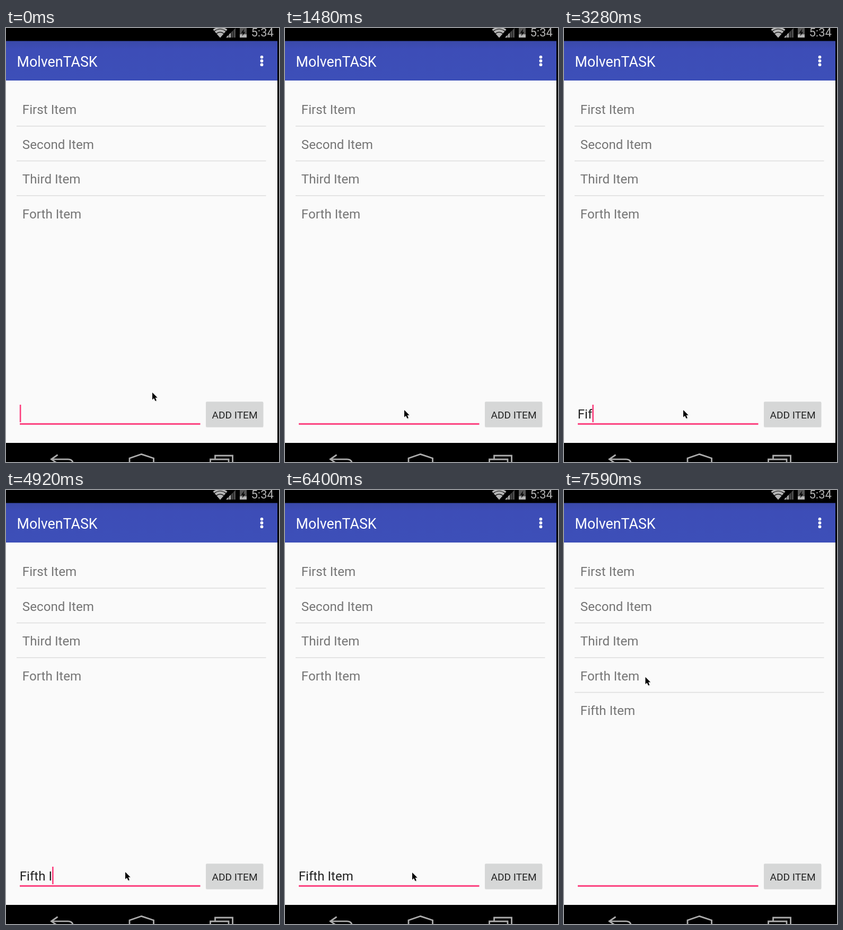
These frames come from a looping animation (515x818 px, 8 s). An HTML page:

```html
<!DOCTYPE html>
<html lang="en">
<head>
<meta charset="utf-8">
<title>Task list</title>
<style>
  html, body { margin: 0; width: 100%; height: 100%; overflow: hidden; background: #000; }
  svg { display: block; width: 515px; height: 818px; font-family: Roboto, sans-serif; }
  .list { font-size: 24.2px; fill: #757575; }
  .rule { stroke: #dcdcdc; stroke-width: 1.4; }
  .nav { fill: none; stroke: #acacac; stroke-width: 2.8; }
</style>
</head>
<body>
<svg viewBox="0 0 515 818">
  <defs>
    <linearGradient id="bar" x1="0" y1="0" x2="0" y2="1">
      <stop offset="0" stop-color="#3a49a8"/>
      <stop offset=".2" stop-color="#3d4db7"/>
      <stop offset="1" stop-color="#3d4fb8"/>
    </linearGradient>
  </defs>
  <rect width="515" height="818"/>

  <!-- status bar -->
  <g fill="#b4b4b4">
    <path d="M404 18.5L390.5 3Q397 -2 404 -2T417.500 3Z"/>
    <path d="M392.500 6.500Q404 -2.500 415.500 6.500M396.500 10.800Q404 4.800 411.500 10.800" fill="none" stroke="#000" stroke-width="1.2"/>
    <path d="M415 18L433 0V18Z" fill="#4a4a4a"/>
    <path d="M415 18L424 9V18Z"/>
    <path d="M420.300 10V18M424.600 6V18M428.800 3V18" stroke="#000" stroke-width=".9"/>
    <path d="M441 0H454V18H441Z" fill="#555"/>
    <path d="M441 12H454V18H441Z"/>
    <path d="M449.500 1L443.500 9.500H447L445.500 15.500L451.500 7.500H448Z" fill="#0c0c0c"/>
    <text x="462.500" y="15.800" font-size="22">5:34</text>
  </g>

  <rect y="24.500" width="512" height="74.500" fill="url(#bar)"/>
  <text x="20.500" y="72.500" font-size="26.800" fill="#fff">MolvenTASK</text>
  <g fill="#fff">
    <circle cx="482.500" cy="54.800" r="2.900"/>
    <circle cx="482.500" cy="62" r="2.900"/>
    <circle cx="482.500" cy="69.200" r="2.900"/>
  </g>

  <rect y="99" width="512" height="683" fill="#fafafa"/>
  <g id="items" class="list"></g>

  <!-- input row -->
  <rect x="26" y="744.800" width="340.500" height="3" fill="#fc3d7c"/>
  <text id="field" x="25.800" y="736" font-size="24.100" fill="#212121"></text>
  <rect id="caret" y="710" width="2.600" height="33" fill="#fc3d7c"/>
  <rect x="377" y="705" width="108.500" height="48" rx="2" fill="#e6e6e6"/>
  <rect x="377" y="704.300" width="108.300" height="47.700" rx="2" fill="#d6d7d7"/>
  <text x="388.500" y="736" font-size="19.100" fill="#212121">ADD ITEM</text>

  <!-- navigation bar -->
  <g class="nav">
    <path d="M97.500 804.500L85.500 812.800L97.500 821M86 812.800H117Q126.500 812.800 126.500 822"/>
    <path d="M233 820V811L255.500 803.300L278.500 811V820"/>
    <path d="M385.500 820V813H420V820M394.500 813V806H427.500V820"/>
  </g>

  <g id="mouse">
    <path d="M1 2V14.500L4 12L6.500 17.500L9 16.500L6.800 11.200H10.500Z" fill="#000" opacity=".18"/>
    <path d="M0 0V13.500L3.100 10.700L5.500 16L7.900 15L5.600 9.800H9.700Z" stroke="#fff" stroke-width="1.800" paint-order="stroke"/>
  </g>
</svg>
<script>
const LOOP = 8000, ADD_TIME = 7140, ROW = 65.5;
const el = id => document.getElementById(id);

// [time, typed text, caret visible]
const typing = [
  [0, '', 1], [590, '', 0], [1030, '', 1], [1480, '', 0],
  [2080, 'F', 1], [2530, 'Fi', 1], [2980, 'Fi', 0],
  [3280, 'Fif', 1], [3730, 'Fift', 1], [3870, 'Fifth', 1],
  [4170, 'Fifth ', 1], [4620, 'Fifth ', 0], [4920, 'Fifth I', 1],
  [5370, 'Fifth It', 1], [5520, 'Fifth Ite', 1], [5660, 'Fifth Item', 1],
  [6110, 'Fifth Item', 0], [6560, 'Fifth Item', 1],
  [ADD_TIME, '', 1], [7590, '', 0]
];

// [time, x, y] of the pointer tip
const pointer = [
  [0, 276, 687], [590, 270, 691], [735, 247, 706], [880, 226, 717], [1030, 225, 720],
  [6260, 240, 721], [6410, 325, 728], [6560, 402, 733], [6700, 415, 734],
  [7440, 330, 580], [7590, 153.5, 352.5]
];

const rows = ['First', 'Second', 'Third', 'Forth', 'Fifth'].map((name, i) => {
  const y = 162 + i * ROW;
  const rule = i ? `<path class="rule" d="M20 ${y - 42.5}H490.500"/>` : '';
  return `<g>${rule}<text x="30.800" y="${y}">${name} Item</text></g>`;
});
el('items').innerHTML = rows.join('');
const added = el('items').lastElementChild;

const at = (steps, t) => steps.findLast(step => step[0] <= t);

function draw(now) {
  const t = now % LOOP;
  const [, text, caretOn] = at(typing, t);
  const [, x, y] = at(pointer, t);
  const field = el('field');
  field.textContent = text.replace(' ', '\u00a0');
  el('caret').setAttribute('x', 25.8 + (text ? field.getComputedTextLength() : 0));
  el('caret').style.visibility = caretOn ? 'visible' : 'hidden';
  el('mouse').setAttribute('transform', `translate(${x} ${y})`);
  added.style.visibility = t >= ADD_TIME ? 'visible' : 'hidden';
}

const start = performance.now();
function tick() {
  draw(performance.now() - start);
  requestAnimationFrame(tick);
}
tick();
</script>
</body>
</html>
```
